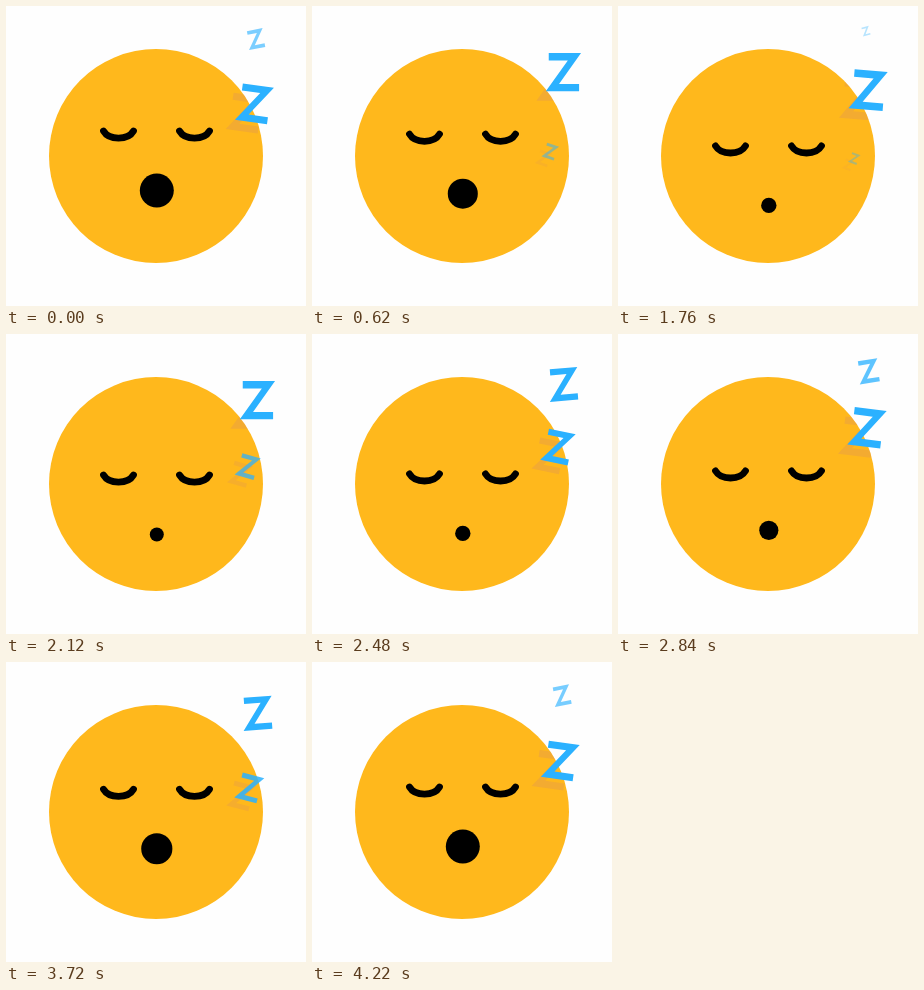
Recreate the animation shown at these times as an HTML page with a canvas. Size 300 by 300 pixels, loop 4240 ms.

```html
<!DOCTYPE html>
<html lang="en">
<head>
<meta charset="utf-8">
<title>Sleeping face</title>
<style>
  html, body { margin: 0; height: 100%; overflow: hidden; background: #fefefe; }
  canvas { display: block; width: 300px; height: 300px; }
</style>
</head>
<body>
<canvas id="stage" width="300" height="300"></canvas>
<script>
const ctx = document.getElementById('stage').getContext('2d');
const LOOP = 4240;
const STARTS = [0, 1263, 2740];
const PEAK = 1860; // age at which a letter is largest

const letter = new Path2D('M-15-19.5H18L-4.5 12H16V19.5H-18L4.5-12H-15Z');
const face = new Path2D();
face.arc(150, 150, 107, 0, 2 * Math.PI);
const eye = new Path2D('M97.5 125C103 134.5 122 134.5 127.5 125');

const clamp = v => Math.max(0, Math.min(1, v));

function drawLetter(x, y, scale, angle, color, alpha) {
  ctx.save();
  ctx.globalAlpha = alpha;
  ctx.fillStyle = color;
  ctx.translate(x, y);
  ctx.rotate(angle);
  ctx.scale(scale, scale);
  ctx.fill(letter);
  ctx.restore();
}

// A letter rises on a curve, growing until its peak and shrinking after it
function drawSnore(age) {
  const q = (age - PEAK) / 1370;
  const x = 250.6 + 6 * q - 8.5 * q * q;
  const y = 79 - 63.5 * q + 10.5 * q * q - 2 * Math.sin(Math.PI * q);
  const scale = 1.01 * Math.cos(1.31 * q);
  const alpha = clamp((1740 - Math.abs(age - PEAK)) / 1000);
  if (scale <= 0 || !alpha) return;
  const angle = .058 - .306 * q;
  const shift = 5 + 4.5 * scale;

  // The shadow falls on the face only
  ctx.save();
  ctx.clip(face);
  drawLetter(x - shift, y + shift, scale, angle, '#e19650', alpha * .4);
  ctx.restore();
  drawLetter(x, y, scale, angle, '#2bb1ff', alpha);
}

function draw(t) {
  const breath = (1 - Math.cos(2 * Math.PI * t / LOOP)) / 2;
  ctx.fillStyle = '#fefefe';
  ctx.fillRect(0, 0, 300, 300);
  ctx.fillStyle = '#ffb81c';
  ctx.fill(face);

  ctx.save();
  ctx.translate(0, 16 * breath);
  ctx.fillStyle = '#000';
  ctx.beginPath();
  ctx.arc(150.8, 184.5, 17 - 10 * breath, 0, 2 * Math.PI);
  ctx.fill();
  ctx.lineWidth = 6.8;
  ctx.lineCap = 'round';
  ctx.stroke(eye);
  ctx.translate(76, 0);
  ctx.stroke(eye);
  ctx.restore();

  for (const start of STARTS) drawSnore((t - start + LOOP) % LOOP);
}

function tick() {
  draw(performance.now() % LOOP);
  requestAnimationFrame(tick);
}
tick();
</script>
</body>
</html>
```
